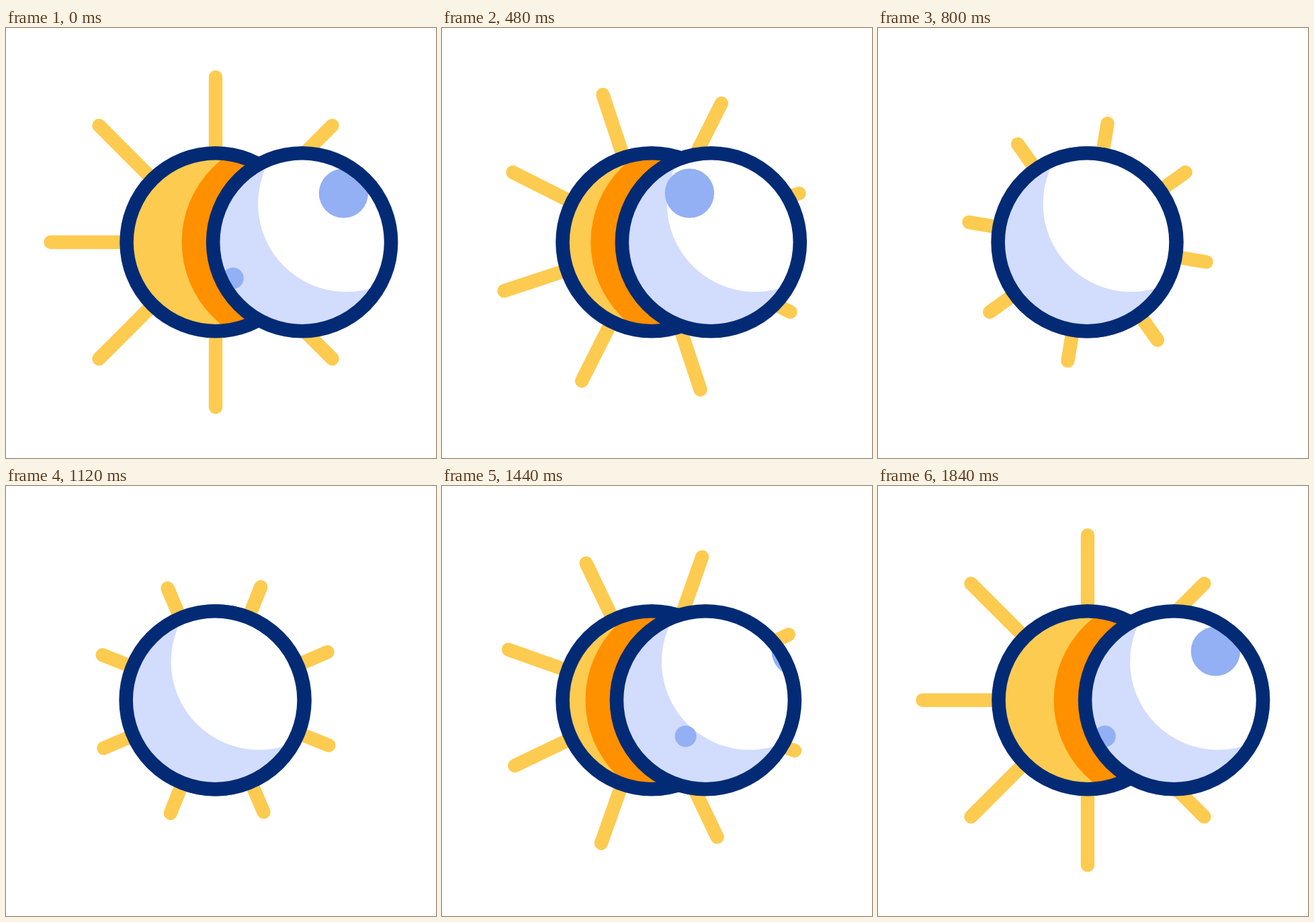
Write an HTML page with a canvas that moves like this. It is 640 px wide and 640 px high and loops after 2000 ms.

```html
<!DOCTYPE html>
<html lang="en">
<head>
<meta charset="utf-8">
<title>Eclipse</title>
<style>
  html, body { margin: 0; width: 100%; height: 100%; overflow: hidden; background: #fff; }
  canvas { display: block; }
</style>
</head>
<body>
<canvas id="stage" width="640" height="640"></canvas>
<script>
const ctx = document.getElementById('stage').getContext('2d');
const LOOP = 2000, STEP = 40, LAST = 1840;
const CY = 318.7, SUN_X = 312, MOON_X = 440.6, RING = 132.5, LINE = 20.6;
const RAY = 245.5, SHRINK = 70, TURN = 225, SLIDE = 129.5, DRIFT = 268;
const NAVY = '#032b75', YELLOW = '#fdcb50', ORANGE = '#ff9000';
const SHADE = '#d2dcfd', CRATER = '#92b0f3';

// 0 to 1 between start and end, fastest at peak; the two power curves meet with equal speed
function ease(t, start, peak, end, powerIn = 2, powerOut = 2) {
  if (t <= start) return 0;
  if (t >= end) return 1;
  const a = (peak - start) / powerIn, b = (end - peak) / powerOut;
  const split = a / (a + b);
  return t < peak
    ? split * ((t - start) / (peak - start)) ** powerIn
    : 1 - (1 - split) * ((end - t) / (end - peak)) ** powerOut;
}

function disc(x, y, r, color) {
  ctx.fillStyle = color;
  ctx.beginPath();
  ctx.arc(x, y, r, 0, 7);
  ctx.fill();
}

// A ringed ball whose details are clipped to its face
function ball(x, color, details) {
  ctx.save();
  ctx.translate(x, CY);
  ctx.save();
  ctx.beginPath();
  ctx.arc(0, 0, RING, 0, 7);
  ctx.clip();
  disc(0, 0, RING, color);
  details();
  ctx.restore();
  ctx.strokeStyle = NAVY;
  ctx.lineWidth = LINE;
  ctx.beginPath();
  ctx.arc(0, 0, RING, 0, 7);
  ctx.stroke();
  ctx.restore();
}

function rays(angle, length) {
  ctx.save();
  ctx.translate(SUN_X, CY);
  ctx.rotate(-angle * Math.PI / 180);
  ctx.strokeStyle = YELLOW;
  ctx.lineWidth = 20.4;
  ctx.lineCap = 'round';
  for (let i = 0; i < 8; i++) {
    ctx.beginPath();
    ctx.moveTo(0, -120);
    ctx.lineTo(0, -length);
    ctx.stroke();
    ctx.rotate(Math.PI / 4);
  }
  ctx.restore();
}

function draw(t) {
  const turn = TURN * ease(t, 0, 800, 1840, 2.9, 2.1);
  const shrink = SHRINK * (ease(t, 290, 580, 900) - ease(t, 965, 1350, 1720));
  const moonX = MOON_X - SLIDE * (ease(t, 275, 535, 795) - ease(t, 1120, 1350, 1740));
  // Craters leave on the left, then come back in from the right
  const drift = DRIFT * (t < 960 ? -ease(t, 250, 525, 800) : 1 - ease(t, 1100, 1224, 1740));

  ctx.fillStyle = '#fff';
  ctx.fillRect(0, 0, 640, 640);
  rays(turn, RAY - shrink);
  ball(SUN_X, YELLOW, () => disc(moonX - 22 - SUN_X, 0, 157, ORANGE));
  ball(moonX, SHADE, () => {
    disc(65.5, -57, 131, '#fff');
    disc(61.8 + drift, -72.7, 36.7, CRATER);
    disc(-102.8 + drift, 53.7, 16, CRATER);
  });
}

const start = performance.now();
function frame() {
  const t = Math.max(0, performance.now() - start) % LOOP;
  draw(Math.min(Math.floor(t / STEP) * STEP, LAST));
  requestAnimationFrame(frame);
}
frame();
</script>
</body>
</html>
```
